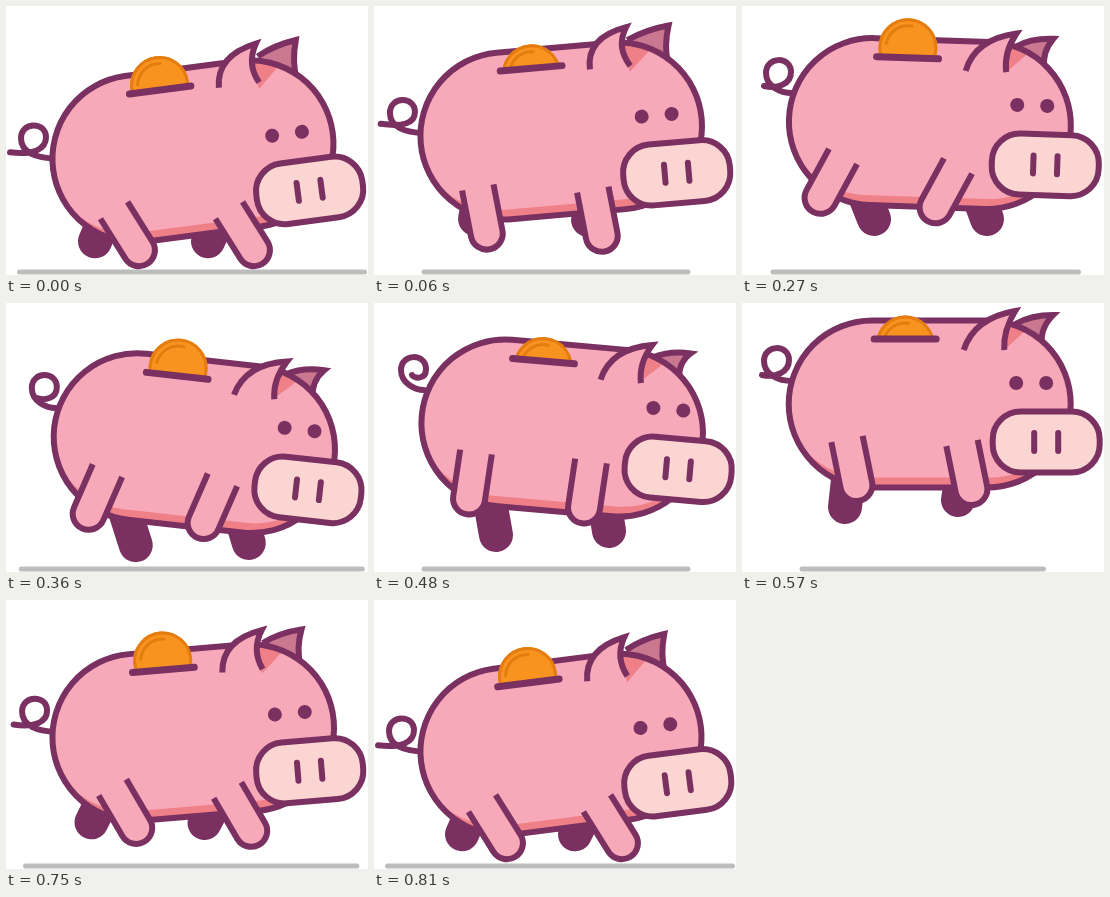
An HTML page with a canvas that plays this animation: 362 by 269 pixels, repeating every 0.84 s.

```html
<!DOCTYPE html>
<html lang="en">
<head>
<meta charset="utf-8">
<title>Running piggy bank</title>
<style>
  html, body { margin: 0; width: 100%; height: 100%; overflow: hidden; background: #fff; }
  canvas { display: block; }
</style>
</head>
<body>
<canvas id="stage" width="362" height="269"></canvas>
<script>
const ctx = document.getElementById('stage').getContext('2d');
const LOOP = 840, STEP = 30, STRIDE = LOOP / 2;
const COLOR = {
  line: '#7a3060', skin: '#f7a8b9', shade: '#ef8087', ear: '#c9788f', snout: '#fbd5d2',
  coin: '#f7931e', rim: '#e57c10', ground: '#bdbdbd'
};

// Smooth periodic curve through [time, value] points; flip negates every other period.
function track(period, times, values, flip = 1) {
  const n = times.length;
  const at = i => {
    const turn = Math.floor(i / n), k = i - turn * n;
    return [times[k] + turn * period, values[k] * (turn % 2 ? flip : 1)];
  };
  const slope = i => {
    const [t0, v0] = at(i), [t1, v1] = at(i + 1);
    return (v1 - v0) / (t1 - t0);
  };
  const tangent = i => {
    const a = slope(i - 1), b = slope(i);
    return a * b <= 0 ? 0 : 2 * a * b / (a + b);
  };
  return t => {
    const turn = Math.floor(t / period), local = t - turn * period;
    let i = n - 1;
    while (times[i] > local) i--;
    const [t0, v0] = at(i), [t1, v1] = at(i + 1);
    const h = t1 - t0, u = (local - t0) / h, w = 1 - u;
    const v = v0 * w * w * (1 + 2 * u) + v1 * u * u * (3 - 2 * u) +
      h * u * w * (w * tangent(i) - u * tangent(i + 1));
    return v * (turn % 2 ? flip : 1);
  };
}

const HOP = [0, 60, 150, 270, 390];
const RUN = [0, 150, 270, 480, 570, 690, 810];
const hop = (values, flip) => track(STRIDE, HOP, values, flip);
const run = values => track(LOOP, RUN, values);

const motion = {
  y: hop([145.3, 125, 101, 117.5, 144.3]),
  tilt: hop([-7.5, -5, 0, 1.9, 7.3], -1),
  groundLeft: hop([13.5, 50, 60, 31, 13.5]),
  groundRight: hop([358.5, 314, 301.5, 336.5, 358.5]),
  coin: hop([4.5, -5.5, -6, 10, 6.5]),
  face: run([16, 7, -0.5, -7, 0, 4.5, 15]),
  nearEar: run([77, 69, 84, 83, 86, 78, 77]),
  farEar: run([117, 116, 121, 122, 124, 117, 117]),
  legAngle: run([32, -28, -28.5, -8.5, 11.5, 26.5, 32]),
  hipX: run([-79, -91, -86, -85, -82, -82, -79]),
  hindHip: run([59, 48, 33, 24, 35, 47.5, 59]),
  frontHip: run([59, 57, 42.5, 33, 39, 54.5, 59]),
  farFootX: run([89, 124, 132, 122, 103, 84, 88]),
  farHind: run([90, 84, 95.5, 107, 103, 89.5, 90]),
  farFront: run([90, 87, 95.5, 103, 96, 91.5, 90]),
  tailX: run([28, 32, 37, 40, 35, 31, 28]),
  tailY: run([-13, -33, -50.5, -58, -43, -32.5, -13]),
  tipX: run([-24, -18, -15, -2, -15, -18, -24]),
  tipY: run([14, 5, 13, 5, 14, 12, 14])
};

function stroke(color = COLOR.line, width = 6, cap = 'butt') {
  ctx.strokeStyle = color;
  ctx.lineWidth = width;
  ctx.lineCap = cap;
  ctx.stroke();
}

function fill(color) {
  ctx.fillStyle = color;
  ctx.fill();
}

function segment(x1, y1, x2, y2, color, width) {
  ctx.beginPath();
  ctx.moveTo(x1, y1);
  ctx.lineTo(x2, y2);
  stroke(color, width, 'round');
}

function dot(x, y, r, color) {
  ctx.beginPath();
  ctx.arc(x, y, r, 0, 2 * Math.PI);
  fill(color);
}

function pill(x, y, w, h, r) {
  ctx.beginPath();
  ctx.roundRect(x - w / 2, y - h / 2, w, h, r);
}

function inPose(p, draw) {
  ctx.save();
  ctx.translate(p.x, p.y);
  ctx.rotate(p.tilt * Math.PI / 180);
  draw();
  ctx.restore();
}

function drawTail(p) {
  const x = p.tailX, y = p.y + p.tailY, endX = x + p.tipX, endY = y + p.tipY;
  ctx.beginPath();
  ctx.moveTo(50, y + 20);
  ctx.bezierCurveTo(x + 2, y + 20, x - 13, y + 14, x - 13, y);
  ctx.bezierCurveTo(x - 13, y - 17, x + 12, y - 17, x + 12, y - 1);
  ctx.bezierCurveTo(x + 12, y + 11, x - 1, endY + 3, endX, endY);
  stroke(COLOR.line, 6, 'round');
}

function drawFarLegs(p) {
  segment(110, p.y + 40, p.farFootX, p.y + p.farHind, COLOR.line, 34);
  segment(225, p.y + 40, p.farFootX + 113, p.y + p.farFront, COLOR.line, 34);
}

function drawNearLeg(x, y, angle) {
  ctx.save();
  ctx.translate(x, y);
  ctx.rotate(-angle * Math.PI / 180);
  ctx.beginPath();
  ctx.moveTo(-16, 0);
  ctx.lineTo(-16, 47);
  ctx.arc(0, 47, 16, Math.PI, 0, true);
  ctx.lineTo(16, 0);
  fill(COLOR.skin);
  stroke();
  ctx.restore();
}

function bodyPath() {
  pill(0.5, 0, 282, 167, 83.5);
}

function drawFarEar(p, lift) {
  ctx.beginPath();
  ctx.moveTo(p.nearEar, -80 + lift);
  ctx.quadraticCurveTo(p.farEar - 22, -89 + lift, p.farEar, -89 + lift * 1.4);
  ctx.quadraticCurveTo(110, -75, 113, -58);
  fill(COLOR.ear);
  stroke();
}

function drawBody() {
  bodyPath();
  fill(COLOR.shade);
  ctx.save();
  ctx.clip();
  pill(-1, -10, 290, 167, 83.5);
  fill(COLOR.skin);
  ctx.beginPath();
  ctx.moveTo(74, -53);
  ctx.lineTo(70, -90);
  ctx.lineTo(96, -73);
  fill(COLOR.shade);
  ctx.restore();
  bodyPath();
  stroke();
}

function drawNearEar(p, lift) {
  ctx.beginPath();
  ctx.moveTo(34.5, -54 + lift);
  ctx.quadraticCurveTo(p.nearEar - 41, -86 + lift, p.nearEar, -93 + lift);
  ctx.quadraticCurveTo(p.nearEar - 12, -74 + lift, 75, -54 + lift);
  fill(COLOR.skin);
  stroke();
}

function drawCoin(p) {
  const x = -24, slotY = -65, y = slotY - p.coin;
  ctx.save();
  ctx.beginPath();
  ctx.rect(x - 40, slotY - 60, 80, 60);
  ctx.clip();
  dot(x, y, 29.5, COLOR.coin);
  ctx.beginPath();
  ctx.arc(x, y, 28, 0, 2 * Math.PI);
  stroke(COLOR.rim, 3);
  ctx.beginPath();
  ctx.arc(x, y, 22, 1.05 * Math.PI, 1.55 * Math.PI);
  stroke(COLOR.rim, 3, 'round');
  ctx.restore();
  segment(x - 31, slotY, x + 31, slotY, COLOR.line, 7);
}

function drawFace(p) {
  ctx.save();
  ctx.translate(-0.37 * p.face, p.face);
  dot(87, -21, 7, COLOR.line);
  dot(117, -21, 7, COLOR.line);
  pill(117, 38, 107, 61, 28);
  fill(COLOR.snout);
  stroke();
  for (const x of [105, 129]) segment(x, 29, x, 47, COLOR.line, 6);
  ctx.restore();
}

function draw(t) {
  const p = {};
  for (const name in motion) p[name] = motion[name](t);
  p.x = 187.2 + 0.1 * p.tilt;
  const lift = -0.35 * p.face;

  ctx.fillStyle = '#fff';
  ctx.fillRect(0, 0, 362, 269);
  segment(p.groundLeft, 266, p.groundRight, 266, COLOR.ground, 5);
  drawTail(p);
  drawFarLegs(p);
  inPose(p, () => {
    drawFarEar(p, lift);
    drawBody();
    drawCoin(p);
    drawNearEar(p, lift);
  });
  const hipX = 187 + p.hipX;
  drawNearLeg(hipX, p.y + p.hindHip, p.legAngle);
  drawNearLeg(hipX + 115, p.y + p.frontHip, p.legAngle);
  inPose(p, () => drawFace(p));
}

const start = performance.now();
function tick() {
  const t = (performance.now() - start) % LOOP;
  draw(Math.floor(t / STEP) * STEP);
  requestAnimationFrame(tick);
}
tick();
</script>
</body>
</html>
```
